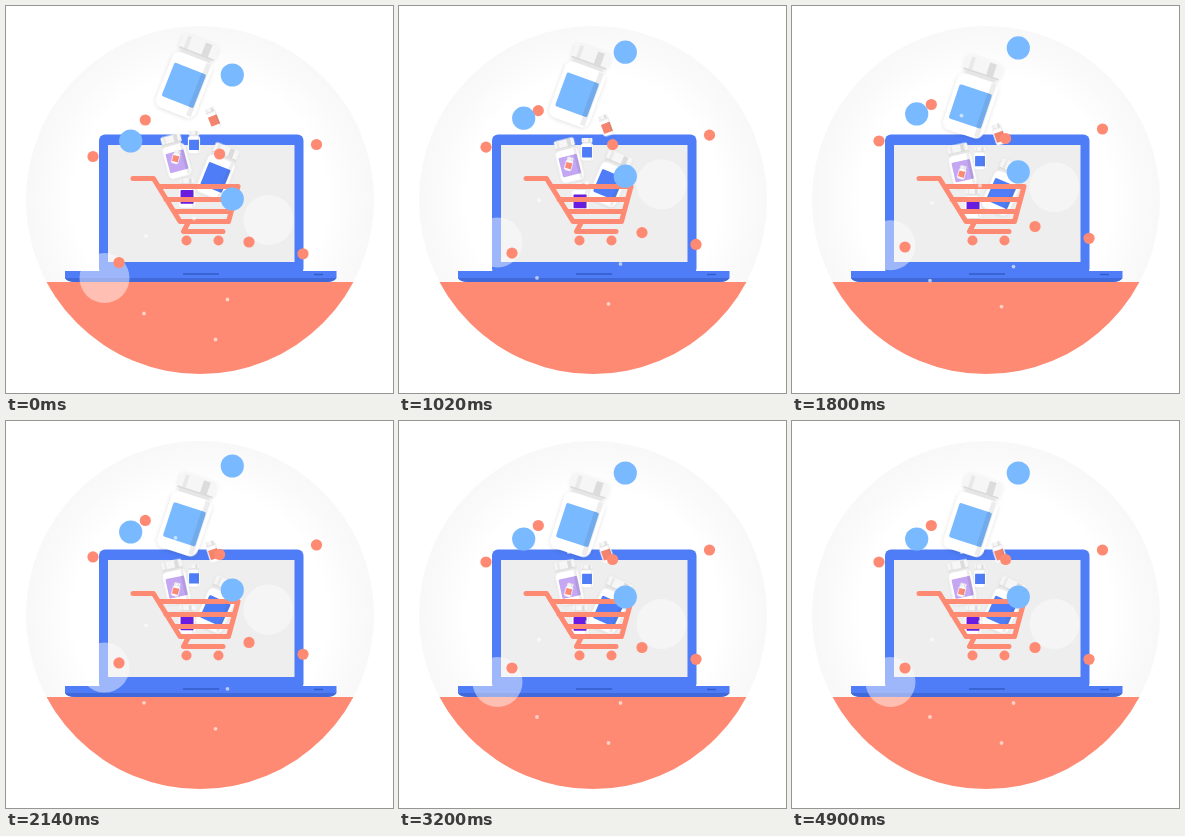
These frames come from a looping animation (387 px wide and 387 px high, 6 s). An HTML page:

```html
<!DOCTYPE html>
<html lang="en">
<head>
<meta charset="utf-8">
<title>Pharmacy cart</title>
<style>
html, body { margin: 0; width: 100%; height: 100%; overflow: hidden; background: #fff; }
svg { display: block; width: 100%; height: 100%; }
</style>
</head>
<body>
<svg viewBox="0 0 387 387">
  <defs>
    <radialGradient id="glow">
      <stop offset=".72" stop-color="#fff"/>
      <stop offset=".9" stop-color="#fafafa"/>
      <stop offset="1" stop-color="#f8f8f8"/>
    </radialGradient>
    <clipPath id="disc"><circle cx="194" cy="194" r="174"/></clipPath>
    <filter id="soft" x="-30%" y="-30%" width="160%" height="160%">
      <feDropShadow dx="0" dy="1" stdDeviation="2" flood-opacity=".13"/>
    </filter>
  </defs>
  <circle cx="194" cy="194" r="174" fill="url(#glow)"/>
  <rect y="276" width="387" height="111" fill="#ff8a73" clip-path="url(#disc)"/>

  <rect x="93" y="128.5" width="204.5" height="140" rx="6" fill="#4f7df8"/>
  <rect x="102" y="139" width="186.500" height="117" fill="#eee"/>
  <path d="M59 265H330.500V272Q328 276 320 276H70Q61 276 59 272Z" fill="#4f7df8"/>
  <path d="M59 272H330.500Q328 276 320 276H70Q61 276 59 272Z" fill="#4169d9"/>
  <path d="M177 268H213M308 268.500H317" stroke="#345bc9" stroke-width="1.500"/>

  <g id="bottles"></g>

  <g fill="none" stroke="#ff8a73" stroke-width="5" stroke-linecap="round" stroke-linejoin="round">
    <path d="M127 172.500H147.500L174 215.500H222.500L232 180.500H153M160 193.500H228M168 205.500H225M182 217L177.500 225.500H217"/>
  </g>
  <g fill="#ff8a73"><circle cx="180.500" cy="234.500" r="5"/><circle cx="212.500" cy="234.500" r="5"/></g>
  <g id="bubbles"></g>
</svg>
<script>
const LOOP = 6000, DROP_END = 2400, FLOAT_END = 3100;
const $ = id => document.getElementById(id);

function add(parent, tag, attrs) {
  const el = document.createElementNS('http://www.w3.org/2000/svg', tag);
  for (const key in attrs) el.setAttribute(key, attrs[key]);
  parent.appendChild(el);
  return el;
}

function box(parent, x, y, width, height, fill, rx = 0) {
  return add(parent, 'rect', { x, y, width, height, fill, rx });
}

function drawBottle(label) {
  const g = add($('bottles'), 'g', {});
  const shape = add(g, 'g', { filter: 'url(#soft)' });
  box(shape, -16, -26, 32, 9, '#e6e6e6');
  box(shape, -21, -20, 42, 59, '#fff', 8);
  box(shape, -18.5, -39, 37, 15, '#f6f6f6', 3);
  box(g, 5, -38, 7, 14, '#dcdcdc');
  box(g, -14, -38, 4, 14, '#e9e9e9');
  box(g, -18.5, -25, 37, 1.5, '#dadada');
  box(g, 13, -19, 5, 56, '#ededed');
  box(g, -17, -8, 34, 36, label, 2);
  box(g, 12, -8, 5, 36, 'rgba(70,90,120,.14)');
  return g;
}

// rest position, scale, tilt at start and end, drop height, label colour
const bottles = [
  [181, 199, .38, 0, 0, 12, '#6a1be0'],
  [188, 155, .29, 0, 0, 19, '#4f7df8'],
  [212, 184, .68, 22, 24, 19, '#4f7df8'],
  [169.5, 161, .55, -15, -12, 11, '#c4a6f2'],
  [170, 169, .17, 15, 15, 18, '#ff8a73'],
  [207, 131, .27, -22, -18, 19, '#f4846e'],
  [181.5, 94.5, 1, 21.5, 18, 24.5, '#79b9ff']
].map(([x, y, size, tilt0, tilt1, drop, label]) =>
  ({ x, y, size, tilt0, tilt1, drop, el: drawBottle(label) }));

// each group floats from one offset to its peak, then settles at zero
const groups = [
  { r: 25, fill: '#fff', opacity: .45, from: 11, peak: -27.5, at: 1240,
    spots: [[98.5, 261], [262.5, 203]] },
  { r: 1.9, fill: '#fff', opacity: .6, from: 11.5, peak: -27, at: 1240,
    spots: [[221.5, 282], [138, 296], [209.5, 322], [140, 218.5], [169.5, 131], [188, 201]] },
  { r: 5.6, fill: '#ff8a73', opacity: 1, from: 9.5, peak: -6, at: 1800,
    spots: [[139.3, 104.5], [87, 141], [310.5, 129], [213.6, 138.5], [113, 247], [243, 226.5], [297, 238.3]] },
  { r: 11.6, fill: '#79b9ff', opacity: 1, from: 17, peak: -11.3, at: 1440,
    spots: [[226.3, 52], [124.7, 118], [226.3, 176]] }
];
for (const group of groups) {
  group.el = add($('bubbles'), 'g', { fill: group.fill, opacity: group.opacity });
  for (const [cx, cy] of group.spots) add(group.el, 'circle', { cx, cy, r: group.r });
}

const ease = p => (1 - Math.cos(Math.PI * Math.min(1, Math.max(0, p)))) / 2;

function floatOffset({ from, peak, at }, t) {
  return t < at
    ? from + (peak - from) * ease(t / at)
    : peak * (1 - ease((t - at) / (FLOAT_END - at)));
}

function render(t) {
  const p = ease(t / DROP_END);
  for (const b of bottles) {
    const y = b.y - b.drop * (1 - p);
    const tilt = b.tilt0 + (b.tilt1 - b.tilt0) * p;
    b.el.setAttribute('transform', `translate(${b.x} ${y}) rotate(${tilt}) scale(${b.size})`);
  }
  for (const g of groups) g.el.setAttribute('transform', `translate(0 ${floatOffset(g, t)})`);
}

const start = performance.now();
function tick() {
  render((performance.now() - start) % LOOP);
  requestAnimationFrame(tick);
}
tick();
</script>
</body>
</html>
```
